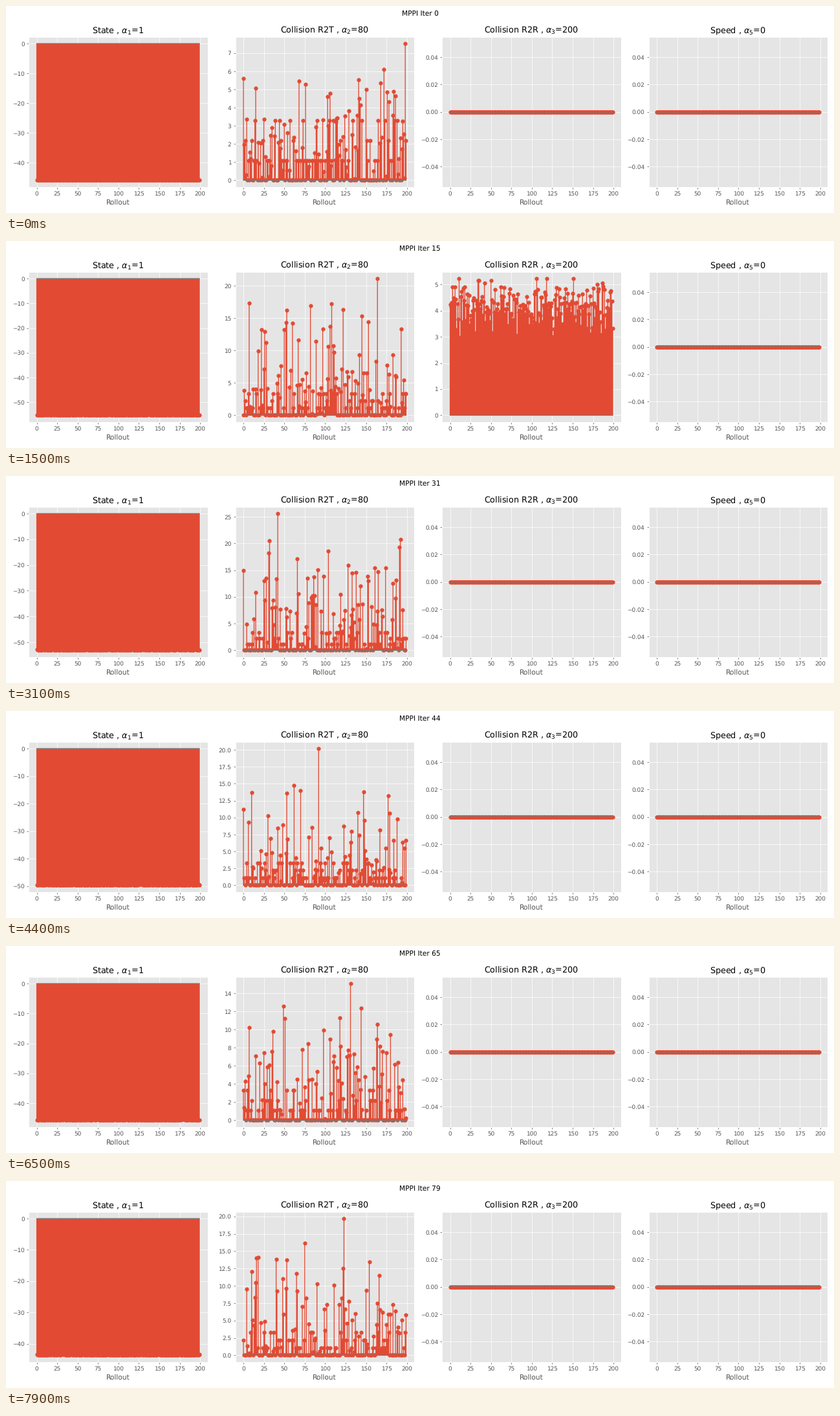
Animation of 1280 by 320 pixels, one loop 8000 ms. Source, as a matplotlib script:

```python
import matplotlib.pyplot as plt
import numpy as np
from matplotlib.animation import FuncAnimation

W, H, DPI = 1280, 320, 64
STEPS, ROLLOUTS = 80, 200
X = np.arange(ROLLOUTS)

# Key iterations with the distance left and the worst target cost
KEYS = [0, 15, 31, 44, 55, 65, 79]
DISTANCE = [45.9, 55.3, 53.1, 49.7, 47.7, 45.7, 43.7]
WORST = [7.53, 21.1, 25.6, 20.2, 10.95, 15.1, 19.7]


def state_cost(i, rng):
    spread = min(0.1 + 0.03 * i, 0.35)
    return -np.interp(i, KEYS, DISTANCE) + spread * rng.random(ROLLOUTS) ** 2


def target_cost(i, rng):
    """Mostly none or a few whole hits, with a long tail up to the worst one."""
    worst = np.interp(i, KEYS, WORST)
    hits = rng.choice(4, ROLLOUTS, p=[0.55, 0.25, 0.1, 0.1])
    tail = 0.85 * worst * rng.beta(1, 1.6, ROLLOUTS)
    cost = np.where(rng.random(ROLLOUTS) < 0.4, tail, 1.1 * hits)
    cost[rng.integers(ROLLOUTS)] = worst
    return cost


def robot_cost(i, rng):
    """The robots pass each other between iterations 4 and 27."""
    if not 4 < i < 27:
        return np.zeros(ROLLOUTS)
    mean = 5.2 * np.sin(np.pi * (i - 4) / 22) - 1
    return np.clip(rng.normal(mean, 0.5, ROLLOUTS), 0, max(mean, 0) + 1.03)


def speed_cost(i, rng):
    return np.zeros(ROLLOUTS)


PANELS = [
    (r"State , $\alpha_1$=1", state_cost),
    (r"Collision R2T , $\alpha_2$=80", target_cost),
    (r"Collision R2R , $\alpha_3$=200", robot_cost),
    (r"Speed , $\alpha_5$=0", speed_cost),
]


class StemPanel:
    def __init__(self, k, title, cost):
        self.cost = cost
        self.seed = k
        self.ax = fig.add_axes([(35 + 319.5 * k) / W, 40 / H,
                                276.5 / W, 232.5 / H])
        self.ax.set_title(title)
        self.ax.set_xlabel("Rollout")
        zeros = np.zeros(ROLLOUTS)
        self.stem = self.ax.stem(X, zeros)
        # Neighbouring stems touch, so the area they share is solid
        self.solid = self.ax.stairs(zeros[1:], X, fill=True, color="C0")
        for part in (self.stem.stemlines, self.stem.baseline, self.solid):
            part.set_snap(False)
        margin = 0.05 * (ROLLOUTS - 1)
        self.ax.set_xlim(-margin, ROLLOUTS - 1 + margin)

    def show(self, i):
        y = self.cost(i, np.random.default_rng([i, self.seed]))
        size = np.abs(y)
        shared = np.sign(y[1:]) * np.minimum(size[1:], size[:-1])
        self.solid.set_data(values=shared)
        self.stem.markerline.set_ydata(y)
        self.stem.stemlines.set_segments([[(x, 0), (x, v)] for x, v in zip(X, y)])
        lo, hi = min(y.min(), 0), max(y.max(), 0)
        pad = 0.05 * (hi - lo) or 0.055
        self.ax.set_ylim(lo - pad, hi + pad)


plt.style.use("ggplot")
plt.rcParams.update({"font.family": "DejaVu Sans", "text.hinting": "none"})
fig = plt.figure(figsize=(W / DPI, H / DPI), dpi=DPI, facecolor="white")
heading = fig.suptitle("MPPI Iter 0")
panels = [StemPanel(k, *spec) for k, spec in enumerate(PANELS)]


def update(i):
    heading.set_text(f"MPPI Iter {i}")
    for panel in panels:
        panel.show(i)
    return []


anim = FuncAnimation(fig, update, frames=STEPS, interval=100, repeat=True)
plt.show()
```
